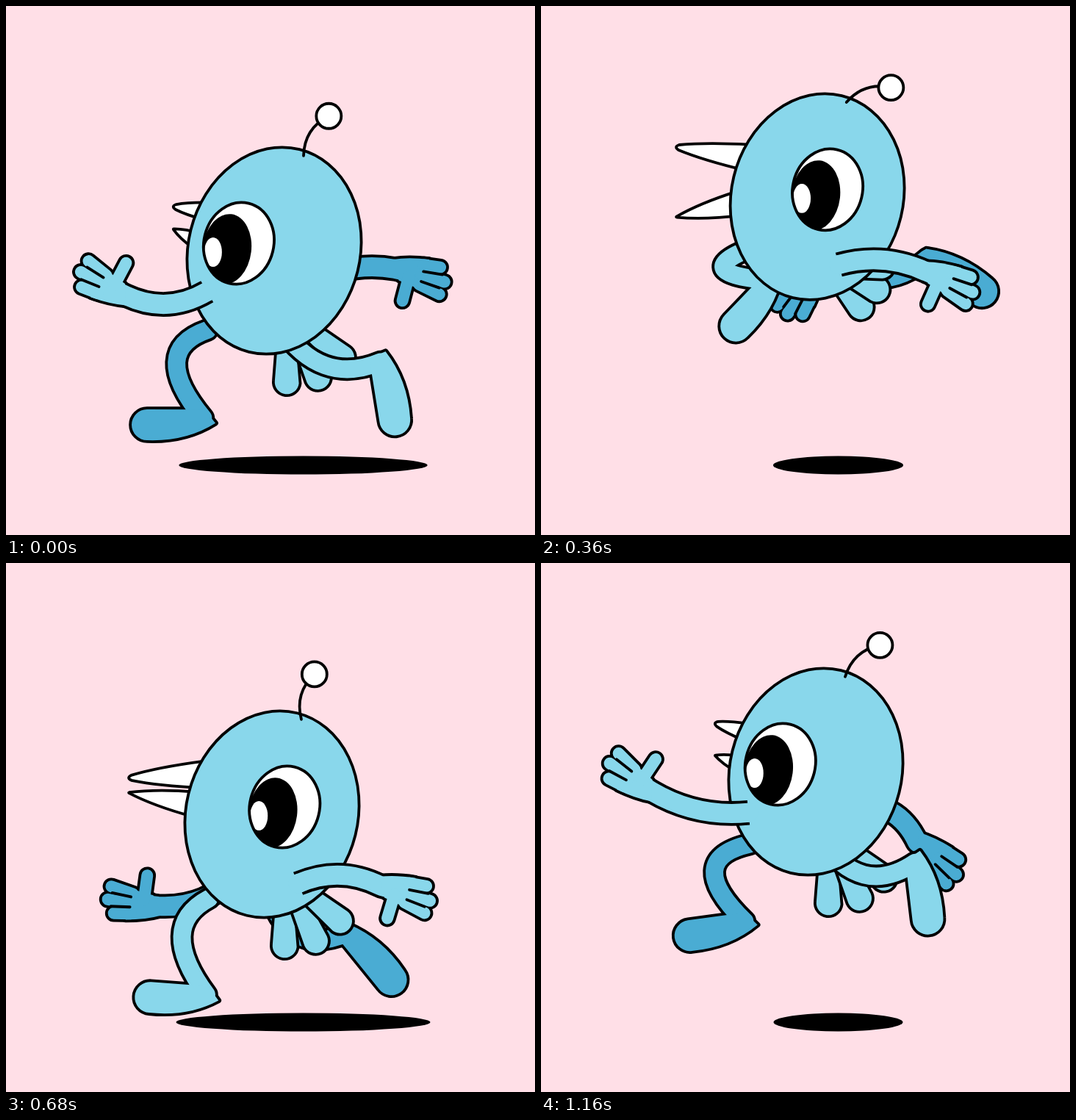
These frames come from a looping animation (720 by 720 pixels, 1200 ms). An HTML page with a canvas:

```html
<!DOCTYPE html>
<html lang="en">
<head>
<meta charset="utf-8">
<title>Runner</title>
<style>
html, body { margin: 0; width: 100%; height: 100%; overflow: hidden; background: #ffdfe7; }
canvas { display: block; width: 720px; height: 720px; }
</style>
</head>
<body>
<canvas id="stage" width="720" height="720"></canvas>
<script>
const ctx = document.getElementById('stage').getContext('2d');
const LOOP = 1200, STEP = 600, TICK = 40, LINE = 3.8;
const PINK = '#ffdfe7', LIGHT = '#89d7eb', DARK = '#4aacd3', INK = '#000', WHITE = '#fff';

const rad = deg => deg * Math.PI / 180;
const clamp = v => Math.min(1, Math.max(0, v));
const wave = (t, peak, period) => Math.cos(2 * Math.PI * (t - peak) / period);
const unit = (x, y) => { const d = Math.hypot(x, y) || 1; return [x / d, y / d]; };

// Periodic, overshoot-free curve through key poses [time, ...values]
function track(keys, period) {
  const n = keys.length;
  const key = i => keys[(i + n) % n];
  const span = i => (key(i + 1)[0] - key(i)[0] + period) % period;
  const rate = (i, c) => (key(i + 1)[c] - key(i)[c]) / span(i);
  const tangent = (i, c) => {
    const a = rate(i - 1, c), b = rate(i, c);
    return a * b <= 0 ? 0 : 2 * a * b / (a + b);
  };
  return time => {
    const t = time % period;
    let i = n - 1;
    while (keys[i][0] > t) i--;
    const h = span(i), s = (t - keys[i][0]) / h, r = 1 - s;
    return keys[i].slice(1).map((y, k) => {
      const c = k + 1;
      return y * (1 + 2 * s) * r * r + key(i + 1)[c] * s * s * (3 - 2 * s)
        + h * s * r * (tangent(i, c) * r - tangent(i + 1, c) * s);
    });
  };
}

// Body centre over one step
const bounce = track([
  [0, 365, 333], [80, 362, 342], [240, 350, 345], [280, 370, 294],
  [400, 377, 254], [480, 377, 260], [560, 374, 284]
], STEP);

// Limb keys are relative to the body centre: x, y, angle
const heelPath = track([
  [0, 154, 133, 84], [80, 105, 146, 54], [260, -3, 96, 123],
  [460, -67, 128, 144], [600, -75, 237, 180], [680, -68, 256, 184],
  [840, 156, 158, 127], [880, 159, 75, 53], [1000, 144, 66, 37],
  [1080, 145, 85, 88], [1160, 144, 103, 85]
], LOOP);
const nearWrist = track([
  [0, -202, 61, 206], [140, -18, 110, 120], [280, 150, 116, 37], [480, 145, 76, 12],
  [680, 149, 98, 15], [840, 82, 108, 109], [1000, -191, 110, 187], [1160, -223, 27, 212]
], LOOP);
const farWrist = track([
  [0, 165, 25, 13], [280, 91, 102, 70], [480, -146, 99, 190],
  [680, -155, 125, 186], [840, -46, 131, 190], [1000, 44, 165, 87], [1160, 138, 96, 38]
], LOOP);

function shape(build, width = 0, cap = 'butt') {
  const path = new Path2D();
  build(path);
  return { path, width, cap };
}

// Paints several shapes as one, with a shared outline
function merge(shapes, fill) {
  for (const s of shapes) {
    ctx.lineCap = s.cap;
    ctx.lineWidth = s.width + 2 * LINE;
    ctx.strokeStyle = INK;
    ctx.stroke(s.path);
  }
  for (const s of shapes) {
    ctx.lineCap = s.cap;
    ctx.lineWidth = s.width;
    ctx.strokeStyle = ctx.fillStyle = fill;
    s.width ? ctx.stroke(s.path) : ctx.fill(s.path);
  }
}

function inkLine(build) {
  ctx.strokeStyle = INK;
  ctx.lineWidth = LINE;
  ctx.lineCap = 'round';
  ctx.stroke(shape(build).path);
}

function ellipse(x, y, rx, ry, tilt, fill) {
  ctx.beginPath();
  ctx.ellipse(x, y, rx, ry, tilt, 0, 2 * Math.PI);
  ctx.fillStyle = fill;
  ctx.fill();
}

function outline() {
  ctx.strokeStyle = INK;
  ctx.lineWidth = LINE;
  ctx.stroke();
}

// Squash peaks on landing; yaw swings the chest from left (-1) to right (1)
function bodyAt(t) {
  const [x, y] = bounce(t);
  const squash = Math.exp(-(((t % STEP - 235) / 60) ** 2));
  return {
    x, y, squash,
    rx: 117, ry: 142 - 42 * squash, tilt: rad(14 - 32 * squash),
    yaw: Math.tanh(2.2 * (wave(t, 560, LOOP) + 0.1))
  };
}

// The knee bends further the closer the ankle comes to the hip
function drawLeg(b, t, fill) {
  const [dx, dy, deg] = heelPath(t);
  const ex = b.x + dx, ey = b.y + dy, a = rad(deg);
  const ux = Math.cos(a), uy = Math.sin(a), ahead = Math.max(0, -dx);
  const hx = b.x - 36 + 0.28 * dx - 0.45 * ahead;
  const hy = b.y + (25 + 0.35 * dy + 0.2 * Math.max(0, dx)) * b.ry / 142;
  let mx = ex + 14 * ux, my = ey + 14 * uy;
  const bend = Math.max(10, 175 - 0.72 * Math.hypot(mx - hx, my - hy));
  const [nx, ny] = unit(mx - hx, my - hy);
  const kx = (hx + mx) / 2 - ny * bend, ky = (hy + my) / 2 + nx * bend - 0.5 * ahead;
  const [vx, vy] = unit(kx - mx, ky - my);
  mx += 12 * vx;
  my += 12 * vy;

  const side = ux * vy - uy * vx < 0 ? -1 : 1, q = side * Math.PI / 2;
  const px = -side * uy, py = side * ux;
  const tx = ex + 98 * ux, ty = ey + 98 * uy;
  const cx = ex + 3 * (ux + vx), cy = ey + 3 * (uy + vy);
  merge([
    shape(p => { p.moveTo(hx, hy); p.quadraticCurveTo(kx, ky, mx, my); }, 24, 'round'),
    shape(p => {
      p.moveTo(cx, cy);
      p.quadraticCurveTo(ex + 45 * ux - 23 * px, ey + 45 * uy - 23 * py, tx - 21 * px, ty - 21 * py);
      p.arc(tx, ty, 21, a - q, a + q, side < 0);
      p.lineTo(cx + 24 * vx, cy + 24 * vy);
      p.closePath();
    })
  ], fill);
}

function drawArm(sx, sy, wx, wy, deg, fill) {
  const a = rad(deg), c = Math.cos(a), s = Math.sin(a);
  const at = (x, y) => [wx + x * c - y * s, wy + x * s + y * c];
  const finger = (x1, y1, x2, y2) =>
    shape(p => { p.moveTo(...at(x1, y1)); p.lineTo(...at(x2, y2)); }, 16, 'round');
  const bend = Math.max(22, 140 - Math.hypot(wx - sx, wy - sy));
  const [nx, ny] = unit(wx - sx, wy - sy);
  merge([
    shape(p => {
      p.moveTo(sx, sy);
      p.quadraticCurveTo((sx + wx) / 2 + ny * bend, (sy + wy) / 2 - nx * bend, wx, wy);
      p.lineTo(...at(14, 0));
    }, 26),
    shape(p => {
      p.moveTo(...at(-6, -12));
      p.quadraticCurveTo(...at(14, -20), ...at(42, -23));
      p.lineTo(...at(42, 20));
      p.lineTo(...at(8, 14));
      p.closePath();
    }),
    finger(36, 13, 66, 20),
    finger(36, 0, 69, 2),
    finger(36, -14, 59, -16),
    finger(20, 6, 19, 40)
  ], fill);
  for (const y of [11.5, -7]) {
    inkLine(p => { p.moveTo(...at(64, y)); p.lineTo(...at(38, y * 0.75)); });
  }
}

// Three feathers fan out and lift as the body drops away below them
function drawTail(b, t) {
  const lift = Math.max(0, wave(t, 340, STEP)), q = Math.PI / 2;
  const len = 80 - 20 * lift;
  for (let i = 0; i < 3; i++) {
    const x = b.x + 17 + 10 * i, y = b.y + 0.7 * b.ry;
    const a = rad(97 - 31 * i - 40 * lift);
    merge([shape(p => {
      p.arc(x, y, 10, a + q, a - q);
      p.arc(b.x + 27 + len * Math.cos(a), y + len * Math.sin(a), 16.5, a - q, a + q);
      p.closePath();
    })], LIGHT);
  }
}

function drawSpike(tx, ty, bx, by, tip) {
  const len = Math.hypot(bx - tx, by - ty), h = 7 + len * 0.11;
  const [ux, uy] = unit(bx - tx, by - ty);
  const at = (x, y) => [tx + x * ux - y * uy, ty + x * uy + y * ux];
  ctx.beginPath();
  ctx.moveTo(...at(len, -h));
  ctx.quadraticCurveTo(...at(len * 0.4, -h * 0.7), ...at(tip, -tip));
  ctx.quadraticCurveTo(...at(-tip, 0), ...at(tip, tip));
  ctx.quadraticCurveTo(...at(len * 0.4, h * 0.7), ...at(len, h));
  ctx.fillStyle = WHITE;
  ctx.fill();
  outline();
}

function drawSpikes(b, t) {
  const x = b.x - 166 - 30 * b.yaw;
  const high = -60 - 14 * wave(t, 450, STEP) + 40 * b.squash;
  const low = -2 + 30 * wave(t, 340, STEP) + 10 * b.squash;
  drawSpike(x, b.y + low, b.x - 106, b.y + 0.4 * low - 2, 0.5);
  drawSpike(x, b.y + high, b.x - 95, b.y - 54 + 37 * b.squash, 3.5);
}

function drawEye(b) {
  const x = b.x - 15.5 + 34 * b.yaw, y = b.y - 10 + 15 * b.squash, k = b.ry / 142;
  ctx.save();
  ellipse(x, y, 47.5, 56 * k, b.tilt, WHITE);
  ctx.clip();
  ellipse(x - 16, y + 8 * k, 33, 48 * k, b.tilt * 0.5, INK);
  ellipse(x - 35, y + 12 * k, 12, 20 * k, 0, WHITE);
  ctx.restore();
  ctx.beginPath();
  ctx.ellipse(x, y, 47.5, 56 * k, b.tilt, 0, 2 * Math.PI);
  outline();
}

function drawAntenna(b, t) {
  const sway = (0.5 + 0.5 * wave(t, 430, STEP)) ** 1.5;
  const a = rad(-75 + 70 * sway - 10 * b.squash), len = 64 - 16 * b.squash;
  const c = Math.cos(a), s = Math.sin(a);
  const x = b.x + 40 - 28 * b.squash, y = b.y - 0.91 * b.ry;
  const ex = x + len * c, ey = y + len * s;
  inkLine(p => {
    p.moveTo(x, y);
    p.quadraticCurveTo((x + ex) / 2 + 19 * s, (y + ey) / 2 - 19 * c, ex, ey);
  });
  ellipse(ex, ey, 17, 17, 0, WHITE);
  outline();
}

function draw(t) {
  const b = bodyAt(t);
  ctx.fillStyle = PINK;
  ctx.fillRect(0, 0, 720, 720);
  ctx.lineJoin = 'round';
  const spread = 88 + 85 * clamp((b.y - 290) / 45) + 45 * b.squash;
  ellipse(404.5, 625, spread, 12.5, 0, INK);

  const [fx, fy, fa] = farWrist(t);
  drawArm(b.x - 50 * b.yaw, b.y + 65 + 20 * b.yaw, b.x + fx, b.y + fy, fa, DARK);
  drawLeg(b, t + STEP, DARK);
  drawTail(b, t);
  drawLeg(b, t, LIGHT);
  drawSpikes(b, t);

  ellipse(b.x, b.y, b.rx, b.ry, b.tilt, LIGHT);
  outline();
  drawAntenna(b, t);
  drawEye(b);

  const [nx, ny, na] = nearWrist(t);
  const sx = b.x - 28 + 66 * b.yaw, sy = b.y + 75 + 20 * b.yaw;
  drawArm(sx, sy, b.x + nx, b.y + ny, na, LIGHT);
  ellipse(sx, sy, 13, 13, 0, LIGHT);
}

const start = performance.now();
function loop() {
  const t = (performance.now() - start) % LOOP;
  draw(Math.floor(t / TICK) * TICK);
  requestAnimationFrame(loop);
}
loop();
</script>
</body>
</html>
```
